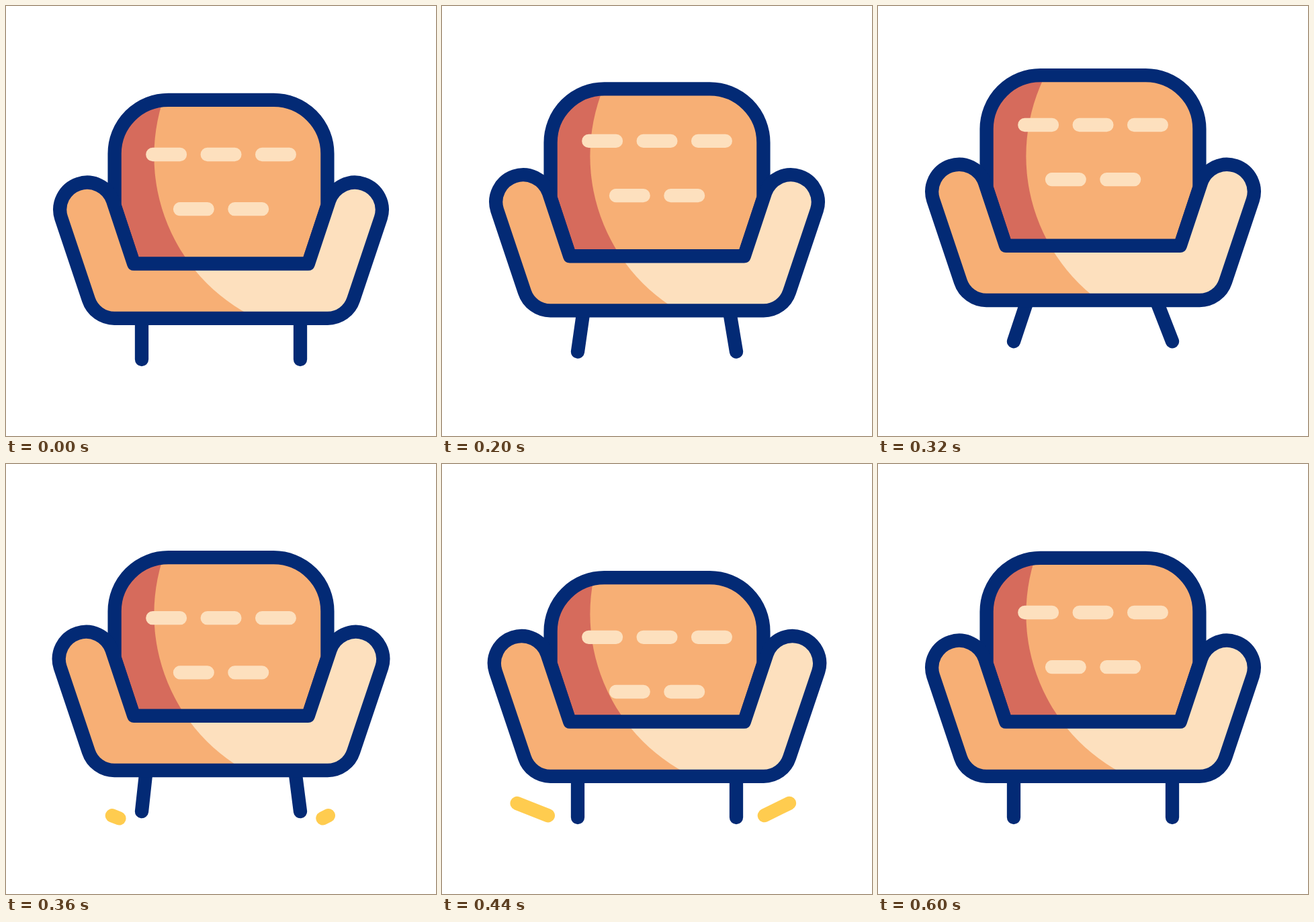
Animation, 640 px wide and 640 px high, one loop 1480 ms. Source, as an HTML page:

```html
<!DOCTYPE html>
<html lang="en">
<head>
<meta charset="utf-8">
<title>Bouncing sofa</title>
<style>
  html, body { margin: 0; height: 100%; overflow: hidden; background: #fff; }
  svg { display: block; width: 100%; height: 100%; }
  path { fill: none; stroke-width: 20.3; stroke-linecap: round; stroke-linejoin: round; }
  .line { stroke: #032a75; }
  .spark { stroke: #ffcc4f; }
  .button { stroke: #fde0be; }
</style>
</head>
<body>
<svg viewBox="0 0 640 640">
  <defs>
    <clipPath id="backClip"><path id="backShape"/></clipPath>
    <clipPath id="seatClip"><path id="seatShape"/></clipPath>
  </defs>
  <path id="legs" class="line"/>
  <g clip-path="url(#backClip)">
    <rect width="640" height="640" fill="#d66b5c"/>
    <circle cx="488.4" cy="223.2" r="268" fill="#f7af75"/>
  </g>
  <path id="buttons" class="button" d="M218.3 221h40.7M299.7 221h40.7M381.1 221h40.7M259 302.2h40.7M340.4 302.2h40.7"/>
  <path id="backLine" class="line"/>
  <g clip-path="url(#seatClip)">
    <rect width="640" height="640" fill="#f7af75"/>
    <circle cx="488.4" cy="223.2" r="268" fill="#fde0be"/>
  </g>
  <path id="seatLine" class="line"/>
  <path id="sparks" class="spark"/>
</svg>
<script>
const LOOP = 1480, STEP = 40;
const $ = id => document.getElementById(id);
const draw = (id, d) => $(id).setAttribute('d', d);

// Vertical offsets as [ms, px] keys
const seatKeys = [[120, 0], [160, -6.3], [280, -21.8], [320, -26.8], [360, -8.8], [400, 0]];
const backKeys = [[120, 0], [160, -9.6], [280, -30.2], [320, -36.7], [360, -0.6], [400, 36.7], [600, 0]];
const buttonKeys = [[120, 0], [160, -12], [280, -36.2], [320, -44], [360, 8.2], [400, 46], [600, 0]];
const armKeys = [[320, 0], [400, 8.2], [600, 0]];

function at(keys, t) {
  if (t <= keys[0][0]) return 0;
  const i = keys.findIndex(k => k[0] >= t);
  if (i < 0) return 0;
  const [t0, a] = keys[i - 1], [t1, b] = keys[i];
  return a + (b - a) * (t - t0) / (t1 - t0);
}

function smooth(x) {
  x = Math.min(1, Math.max(0, x));
  return x * x * (3 - 2 * x);
}

function backPath(top, seat) {
  const y = 139.8 + top;
  return `M190.2 ${383.7 + seat}L161.6 ${297 + seat}V${y + 80}A80 80 0 0 1 241.6 ${y}` +
    `H398.4A80 80 0 0 1 478.4 ${y + 80}V${297 + seat}L449.8 ${383.7 + seat}Z`;
}

function seatPath(y, reach) {
  const dx = reach * 0.36, inner = 289.6 + y - reach, outer = 315.3 + y - reach;
  return `M190.2 ${383.7 + y}H449.8L${481.1 + dx} ${inner}` +
    `A40.5 40.5 0 0 1 ${557.9 + dx} ${outer}L517.1 ${437 + y}` +
    `A40.5 40.5 0 0 1 478.7 ${464.8 + y}H161.3A40.5 40.5 0 0 1 122.9 ${437 + y}` +
    `L${82.1 - dx} ${outer}A40.5 40.5 0 0 1 ${158.9 - dx} ${inner}Z`;
}

function sparkPath(x, y, dx, dy, head, tail) {
  return `M${x + dx * tail} ${y + dy * tail}L${x + dx * head} ${y + dy * head}`;
}

function render(t) {
  const seat = at(seatKeys, t), top = at(backKeys, t);
  const back = backPath(top, seat), base = seatPath(seat, at(armKeys, t));
  draw('backShape', back);
  draw('backLine', back);
  draw('seatShape', base);
  draw('seatLine', base);
  $('buttons').setAttribute('transform', `translate(0 ${at(buttonKeys, t)})`);

  const hip = 464.8 + seat, foot = 526 + seat;
  draw('legs', `M${202 - 0.76 * seat} ${hip}L202 ${foot}M${438 + 0.89 * seat} ${hip}L438 ${foot}`);

  const head = smooth((t - 320) / 160), tail = smooth((t - 400) / 160);
  draw('sparks', head > tail
    ? sparkPath(168.4, 527.4, -67.3, -26.6, head, tail) + sparkPath(471.4, 527.3, 54, -26.6, head, tail)
    : '');
}

function frame(now) {
  render(Math.floor(now % LOOP / STEP) * STEP);
  requestAnimationFrame(frame);
}
render(0);
requestAnimationFrame(frame);
</script>
</body>
</html>
```
